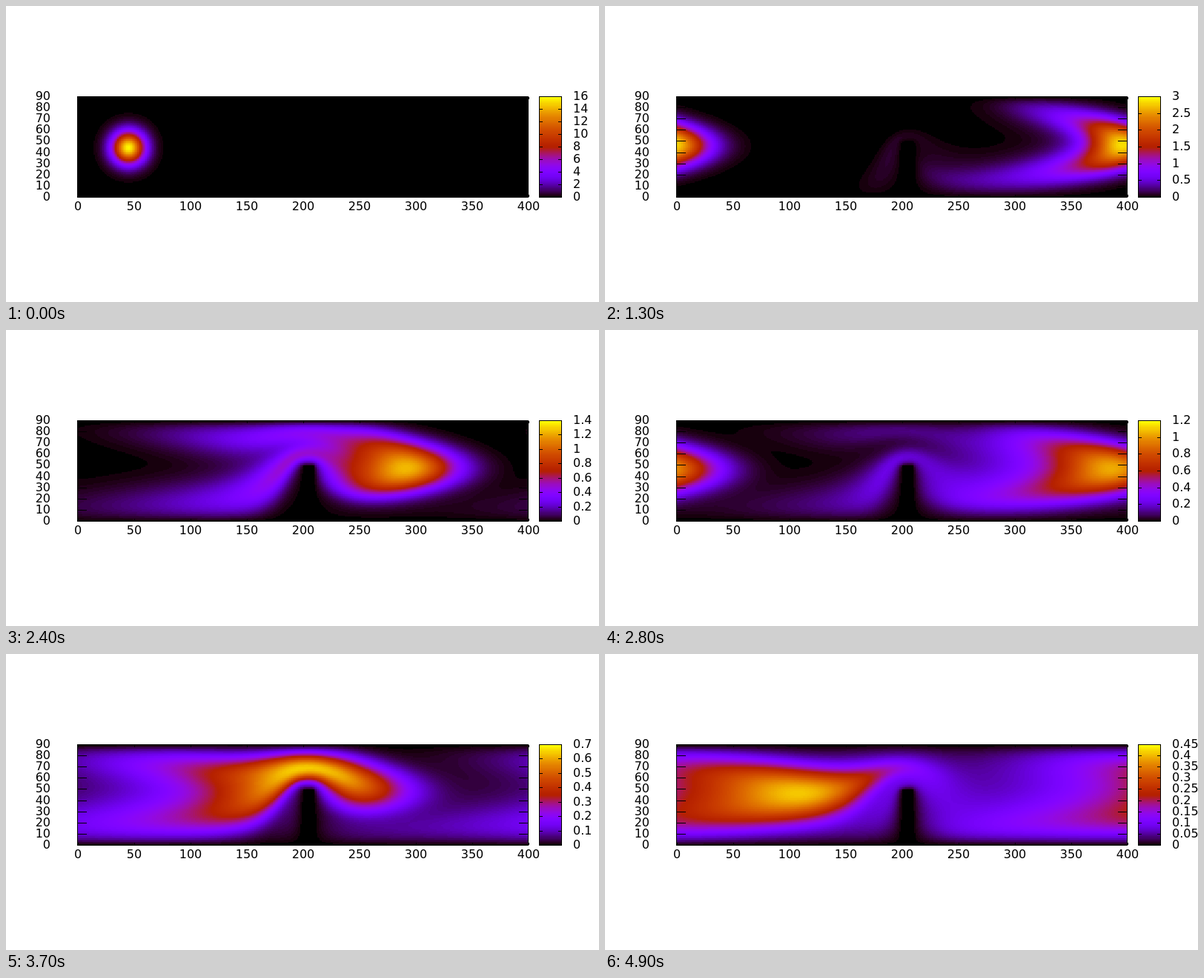
An HTML page with a canvas for the animation above (5000 ms loop, 800 by 400 pixels).

```html
<!DOCTYPE html>
<html>
<head>
<meta charset="utf-8">
<style>
html, body { margin: 0; width: 100%; height: 100%; overflow: hidden; background: #fff; }
canvas { display: block; }
</style>
</head>
<body>
<canvas id="stage" width="800" height="400"></canvas>
<script>
// A puff of dye in a periodic channel with a step: creeping flow, diffusion, absorbing walls.
// Lengths are in axis units, times in frames of 100 ms; cells are 2 units wide.
const H = 2, NX = 200, NY = 45, ROW = NY + 2;
const SPEED = 25.5, DIFF = 13, SUB = 60, FRAMES = 50;
const STEP = { left: 100, right: 105, top: 25 };

// Stream function at the cell corners, from the biharmonic equation near the step
function solveFlow() {
  const first = 43, cols = 120, n = NY - 1, band = 2 * n, size = cols * n;
  const at = (i, j) => i * (NY + 1) + j;
  const psi = new Float64Array(NX * (NY + 1));
  const wall = (i, j) => j <= 0 || j >= NY || (i >= STEP.left && i <= STEP.right && j <= STEP.top);
  const known = (i, j) => wall(i, j) || i < first || i >= first + cols;
  for (let i = 0; i < NX; i++) for (let j = 0; j <= NY; j++) {
    const s = j / NY;
    psi[at(i, j)] = j < NY && wall(i, j) ? 0 : SPEED * 60 * s * s * (3 - 2 * s);
  }
  const w = band + 1, A = new Float64Array((size + w) * w), b = new Float64Array(size + w);
  const index = (i, j) => (i - first) * n + j - 1;
  for (let i = first; i < first + cols; i++) for (let j = 1; j < NY; j++) {
    const k = index(i, j);
    if (wall(i, j)) { A[k * w] = 1; continue; }
    const add = (x, y, f) => {
      if (known(x, y)) b[k] -= f * psi[at(x, y)];
      else if (index(x, y) >= k) A[k * w + index(x, y) - k] += f;
    };
    add(i, j, 20);
    for (const [dx, dy] of [[1, 0], [0, 1], [-1, 0], [0, -1]]) {
      add(i + dx, j + dy, -8);
      add(i + dx - dy, j + dy + dx, 2);
      if (wall(i + dx, j + dy)) add(i, j, 1);   // no slip: mirror image
      else add(i + 2 * dx, j + 2 * dy, 1);
    }
  }
  for (let k = 0; k < size; k++) for (let e = 1; e <= band; e++) {
    const f = A[k * w + e] / A[k * w];
    if (!f) continue;
    for (let d = e; d <= band; d++) A[(k + e) * w + d - e] -= f * A[k * w + d];
    b[k + e] -= f * b[k];
  }
  for (let k = size - 1; k >= 0; k--) {
    for (let d = 1; d <= band; d++) b[k] -= A[k * w + d] * b[k + d];
    b[k] /= A[k * w];
  }
  for (let i = first; i < first + cols; i++) for (let j = 1; j < NY; j++)
    if (!wall(i, j)) psi[at(i, j)] = b[index(i, j)];
  return (i, j) => psi[at(i % NX, Math.max(0, Math.min(NY, j)))];
}

// Cells are stored with one solid row below and above the channel.
const cells = NX * ROW, solid = new Uint8Array(cells);
let dye = new Float64Array(cells), oldRate = null;
const face = { px: new Float64Array(cells), qx: new Float64Array(cells),
               py: new Float64Array(cells), qy: new Float64Array(cells) };

function setup() {
  const psi = solveFlow();
  for (let i = 0; i < NX; i++) for (let j = 0; j < ROW; j++) {
    const k = i * ROW + j;
    solid[k] = j < 1 || j > NY || (i >= STEP.left && i < STEP.right && j <= STEP.top);
    const dx = i * H + 1 - 45, dy = j * H - 1 - 44.5;
    dye[k] = solid[k] ? 0 : 50 / Math.PI * Math.exp(-(dx * dx + dy * dy) / 200);
  }
  for (let i = 0; i < NX; i++) for (let j = 0; j <= NY; j++) {
    const k = i * ROW + j, r = (i + 1) % NX * ROW + j, unit = 1 / SUB / H;
    const set = (p, q, flow, other) => {
      const d = DIFF / H * (solid[k] !== solid[other] ? 2 : 1);
      p[k] = (d + flow / 2) * unit;
      q[k] = (d - flow / 2) * unit;
    };
    set(face.px, face.qx, (psi(i + 1, j) - psi(i + 1, j - 1)) / H, r);
    set(face.py, face.qy, (psi(i, j) - psi(i + 1, j)) / H, k + 1);
  }
}

function advance() {
  const { px, qx, py, qy } = face, rate = new Float64Array(cells);
  for (let i = 0; i < NX; i++) {
    const next = (i + 1) % NX * ROW;
    for (let j = 0; j <= NY; j++) {
      const k = i * ROW + j, r = next + j;
      const fx = px[k] * dye[k] - qx[k] * dye[r];
      const fy = py[k] * dye[k] - qy[k] * dye[k + 1];
      rate[k] -= fx + fy;
      rate[r] += fx;
      rate[k + 1] += fy;
    }
  }
  const old = oldRate || rate;
  for (let k = 0; k < cells; k++) if (!solid[k]) dye[k] += 1.5 * rate[k] - 0.5 * old[k];
  oldRate = rate;
}

const history = [];
function dyeAt(frame) {
  while (history.length <= frame) {
    if (history.length) for (let s = 0; s < SUB; s++) advance();
    history.push(dye.slice());
  }
  return history[frame];
}

const LEVELS = 128, palette = [];
for (let k = 0; k < LEVELS; k++) {
  const x = k / (LEVELS - 1);
  palette.push([Math.sqrt(x), x ** 3, Math.max(0, Math.sin(2 * Math.PI * x))].map(v => Math.round(255 * v)));
}
const colour = v => palette[Math.max(0, Math.min(LEVELS - 1, Math.floor(v * LEVELS)))];

const ctx = document.getElementById("stage").getContext("2d");
const map = document.createElement("canvas");
map.width = 400;
map.height = 90;
const mapCtx = map.getContext("2d"), pixels = mapCtx.createImageData(400, 90);

function paintMap(c, top) {
  for (let y = 0; y < 90; y++) for (let x = 0; x < 400; x++) {
    const i = x >> 1, j = (y >> 1) + 1, k = i * ROW + j;
    const side = (i + (x & 1 ? 1 : NX - 1)) % NX, up = y & 1 ? 1 : -1;
    const m = side * ROW + j;
    const v = solid[k] ? 0 : (9 * c[k] + 3 * c[m] + 3 * c[k + up] + c[m + up]) / 16;
    pixels.data.set([...colour(v / top), 255], ((89 - y) * 400 + x) * 4);
  }
  mapCtx.putImageData(pixels, 0, 0);
}

function bar(x, y, w, h) { ctx.fillRect(Math.round(x), Math.round(y), w, h); }
function label(text, x, y, align) {
  ctx.textAlign = align;
  ctx.fillText(text, x, y + 5);
}

function draw(frame) {
  const c = dyeAt(frame), peak = c.reduce((a, b) => Math.max(a, b));
  const power = 10 ** Math.floor(Math.log10(peak)), lead = peak / power;
  const tic = power * (lead < 2 ? 0.2 : lead < 5 ? 0.5 : 1);
  const count = Math.ceil(peak / tic), top = count * tic;

  ctx.fillStyle = "#fff";
  ctx.fillRect(0, 0, 800, 400);
  ctx.fillStyle = "#000";
  ctx.fillRect(96, 122, 609, 137);
  ctx.fillRect(719, 122, 31, 137);
  paintMap(c, top);
  ctx.imageSmoothingEnabled = false;
  ctx.drawImage(map, 97, 123, 607, 135);
  for (let y = 0; y < 135; y++) {
    ctx.fillStyle = `rgb(${colour((y + 0.5) / 135)})`;
    ctx.fillRect(720, 257 - y, 29, 1);
  }

  ctx.fillStyle = "#000";
  ctx.font = "16px 'DejaVu Sans', sans-serif";
  for (let v = 0; v <= 90; v += 10) {
    const y = 258 - v * 136 / 90;
    bar(97, y, 12, 1);
    bar(692, y, 12, 1);
    label(v, 60, y, "right");
  }
  for (let v = 0; v <= 400; v += 50) {
    const x = 96.5 + v * 1.52;
    bar(x, 123, 1, 3);
    bar(x, 255, 1, 3);
    label(v, x + 0.5, 271, "center");
  }
  for (let k = 0; k <= count; k++) {
    const y = 258 - 136 * k / count;
    bar(719, y, 5, 1);
    bar(745, y, 5, 1);
    label(+(k * tic).toFixed(2), 765, y, "left");
  }
}

setup();
let shown = -1, start = null;
function tick(now) {
  if (start === null) start = now;
  const frame = Math.floor((now - start) / 100) % FRAMES;
  if (frame !== shown) draw(shown = frame);
  requestAnimationFrame(tick);
}
draw(shown = 0);
requestAnimationFrame(tick);
</script>
</body>
</html>
```
